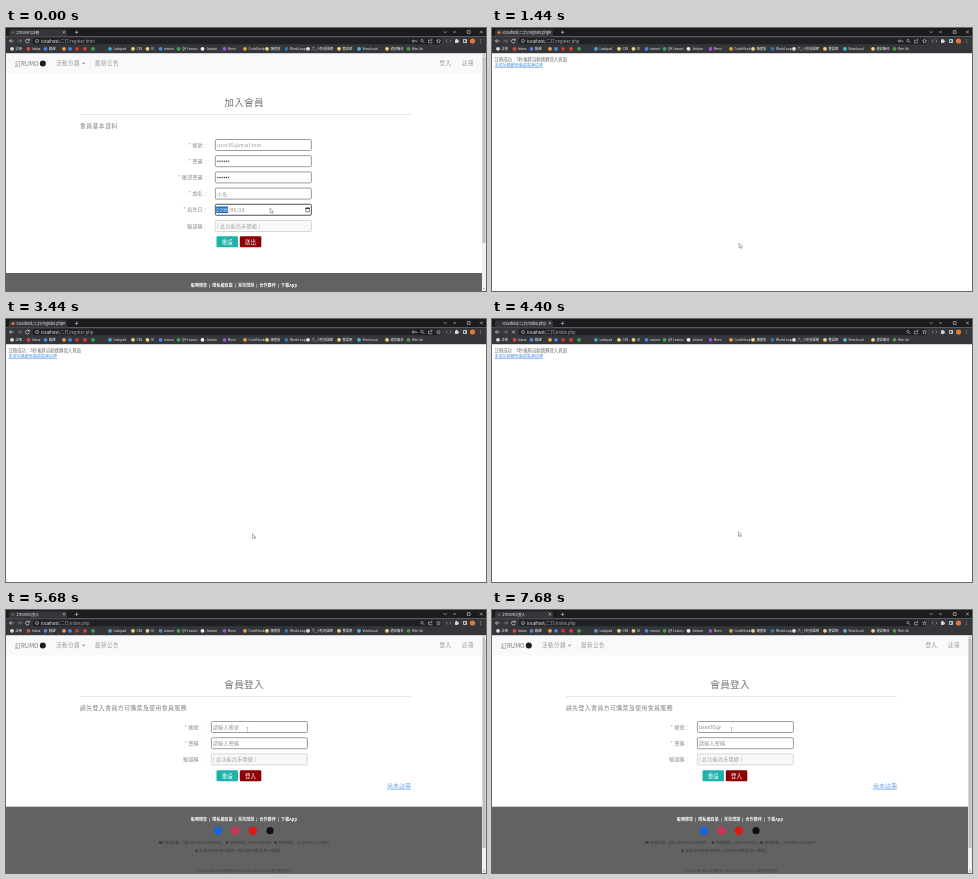
Write an HTML page that moves like this. It is 480 px wide and 263 px high and loops after 8000 ms.

```html
<!DOCTYPE html>
<html lang="zh-Hant">
<head>
<meta charset="utf-8">
<title>Member sign-up</title>
<style>
html, body { margin: 0; width: 100%; height: 100%; overflow: hidden; background: #fff; }
svg { display: block; width: 100%; height: 100%; }
text { font-family: "Noto Sans CJK TC", "Noto Sans CJK JP", "Noto Sans CJK", "Noto Sans", sans-serif; white-space: pre; }
</style>
</head>
<body>
<svg id="stage" viewBox="0 0 480 263"></svg>
<script>
const LOOP = 8000, SUBMITTED = 1400, LOADING = 4240, LOGIN = 4480;
const TYPING = 6000, KEY_GAP = 240;
const EMAIL = 'user35@mail.test', BRAND = '訂RUMO', COLON = '\uff1a';

const text = (x, y, size, fill, value, extra = '') =>
  `<text x="${x}" y="${y}" font-size="${size}" fill="${fill}" ${extra}>${value}</text>`;
const rect = (x, y, w, h, fill, extra = '') =>
  `<rect x="${x}" y="${y}" width="${w}" height="${h}" fill="${fill}" ${extra}/>`;
const dot = (x, y, r, fill, extra = '') =>
  `<circle cx="${x}" cy="${y}" r="${r}" fill="${fill}" ${extra}/>`;
const line = (d, stroke, width = .7, extra = '') =>
  `<path d="${d}" fill="none" stroke="${stroke}" stroke-width="${width}" ${extra}/>`;
const group = (id, content) => `<g id="${id}">${content}</g>`;
const middle = 'text-anchor="middle"', end = 'text-anchor="end"';
const spaced = gap => `letter-spacing="${gap}"`;

// [icon x, icon colour, label]
const bookmarks = [
  [6, '#ddd', '註冊'], [22.5, '#e0483e', 'Inbox'], [39.5, '#4b86e8', '翻譯'],
  [58, '#e8a33d', ''], [64, '#4b86e8', ''], [71, '#d8342c', ''], [79, '#e0402c', ''], [87, '#3fa35b', ''],
  [104, '#46a5d8', 'Larkpad'], [127, '#f0d27a', 'CSS'], [141.5, '#f0d27a', 'UI'],
  [154.5, '#4b86e8', 'uimori'], [172.5, '#3fa35b', 'Q4 Lesson'], [196.5, '#eee', 'Jottum'],
  [218.5, '#a050d8', 'Brevi'], [239, '#e8a33d', 'CodeNook'], [261, '#f0d27a', '讀書會'],
  [280.5, '#2a78b8', 'WorkLoop'], [302, '#ddd', '六_小吃地圖網'], [333, '#f0d27a', '雙語網'],
  [353, '#4ab8d8', 'ViewLocal'], [381, '#f0d27a', '通訊聯合'], [402.5, '#4e9a48', 'Kite.lib']
];

function browser() {
  const ink = '#d5d6d8';
  return rect(0, 0, 480, 8.6, '#1b1c1e') +
    `<path d="M1 8.6Q3 8.6 3 6V3Q3 1.2 5 1.2H59Q61 1.2 61 3V6Q61 8.6 63 8.6Z" fill="#35363a"/>` +
    rect(0, 8.6, 480, 16.6, '#35363a') +
    rect(26.5, 9.8, 409, 6.4, '#202124', 'rx="3.2"') +
    dot(7, 4.5, 1.6, '#777', 'id="favicon"') +
    text(10.5, 5.8, 3.7, '#f0f0f0', '', 'id="tabTitle"') +
    line('M56.7 3l2.4 2.4m0-2.4l-2.4 2.4M68.8 4.3h3.6m-1.8-1.8v3.6', ink, .6) +
    line('M437.7 3.4l1.5 1.5 1.5-1.5M447 4h3M461.3 2.6h2.8v2.8h-2.8ZM474 2.6l2.8 2.8m0-2.8l-2.8 2.8', ink, .6) +
    line('M7.5 13H3.5m1.8-1.8L3.5 13l1.8 1.8', ink) +
    line('M11.5 13h4m-1.8-1.8l1.8 1.8-1.8 1.8', '#87898c') +
    group('reload', line('M23 12a1.9 1.9 0 1 0 .2 1.8M23.3 10.8v1.5h-1.5', ink)) +
    group('stop', line('M20 11.5l3 3m0-3l-3 3', ink)) +
    dot(31, 13, 1.6, 'none', `stroke="${ink}" stroke-width=".5"`) + line('M31 12.7v1.2', ink, .5) +
    text(35, 14.6, 4.15, '#b0b2b5', '<tspan fill="#fff" font-weight="500">localhost</tspan><tspan id="path"></tspan>') +
    group('key', dot(407.3, 13, 1, 'none', `stroke="${ink}" stroke-width=".6"`) + line('M408.3 13h2.5v1', ink, .6)) +
    dot(416, 12.6, 1.2, 'none', `stroke="${ink}" stroke-width=".5"`) + line('M417 13.6l1.3 1.3', ink, .6) +
    line('M424 12h-1.5v2.8h3.4v-1.2M424 13.3q.2-1.6 2.2-1.6m-1-.9l1 .9-1 .9', ink, .5) +
    line('M432.5 10.9l.6 1.4 1.5.1-1.1 1 .3 1.5-1.3-.8-1.3.8.3-1.5-1.1-1 1.5-.1Z', ink, .5) +
    line('M441.3 11.6L440 13l1.3 1.4m2.4-2.8L445 13l-1.3 1.4', '#9a9ca0', .6) +
    rect(449, 11.7, 3.2, 3.2, ink) + dot(450.5, 11.5, .8, ink) + dot(452.3, 13.3, .8, ink) +
    rect(457.2, 11.2, 3.6, 3.6, '#eee') + rect(457.9, 11.9, 1.6, 2.2, '#35363a') +
    dot(466.5, 13, 2.6, '#e07a3c') +
    [11.6, 13, 14.4].map(y => dot(474.5, y, .4, ink)).join('') +
    bookmarks.map(([x, color, label]) =>
      dot(x, 20.8, 1.9, color) + text(x + 3.4, 22, 3.3, '#f2f2f2', label, 'font-weight="500"')).join('');
}

const navbar = () => rect(0, 25.2, 480, 20.3, '#f8f9fa') +
  text(9, 37.8, 6, '#777', BRAND) + dot(36.8, 35.6, 3, '#1c1c1c') +
  text(50, 37.4, 5.5, '#999', '活動分類', spaced(.5)) + '<path d="M76 34.8h3.2l-1.6 1.8z" fill="#888"/>' +
  [[89, '最新公告'], [433.5, '登入'], [456, '註冊']].map(([x, s]) => text(x, 37.4, 5.5, '#999', s, spaced(.5))).join('');

const scrollbar = thumbEnd => rect(476, 25.2, 4, 238, '#f1f1f1') +
  rect(476.4, 28.5, 3.2, thumbEnd - 28.5, '#c1c1c1') +
  '<path d="M477 27.5h2l-1-1.2zM477 260.5h2l-1 1.2z" fill="#777"/>';

const heading = (title, subtitle) => text(218.3, 78.2, 9.6, '#777', title, spaced(.3)) +
  line('M74 86.5H405', '#dcdcdc') +
  text(74, 100.3, 5.9, '#808080', subtitle, spaced(.4));

const rowY = row => 117 + row * 16.2;

function field(x, row, label, value, { required = true, disabled = false, id = '' } = {}) {
  const y = rowY(row);
  const star = required ? '<tspan fill="#c58080">* </tspan>' : '';
  return text(x - 7, y + 1.6, 5, '#8a8a8a', star + label + COLON, `${end} ${spaced(.2)}`) +
    rect(x + .4, y - 5.5, 96, 11, disabled ? '#f8f8f8' : '#fff',
      `rx="1.2" stroke="${disabled ? '#d0d0d0' : '#848484'}" stroke-width=".8"`) +
    text(x + 2, y + 1.9, 5, disabled ? '#a0a0a0' : '#959595', value, spaced(.25) + (id && ` id="${id}"`));
}

const locked = (x, row) => field(x, row, '驗證碼', '( 此功能尚未開通 )', { required: false, disabled: true });
const password = (x, row) => Array.from({ length: 6 }, (_, i) => dot(x + 3 + i * 2.1, rowY(row), .75, '#444')).join('');
const button = (x, y, fill, label) => rect(x, y, 21.5, 11, fill, 'rx="1.2"') +
  text(x + 10.75, y + 7.6, 5.5, '#fff', label, middle);
const buttons = (x, y, action) => button(x, y, '#20b2aa', '重設') + button(x + 23.3, y, '#8b0000', action);

const footer = top => rect(0, top, 480, 263 - top, '#626262') +
  text(238, top + 14, 4, '#fff', '服務條款  |  隱私權政策  |  常見問題  |  合作夥伴  |  下載App',
    `${middle} font-weight="700" ${spaced(.08)}`);

function registerPage() {
  const x = 209, y = rowY(4);
  return navbar() + heading('加入會員', '會員基本資料') +
    field(x, 0, '帳號', EMAIL) +
    field(x, 1, '密碼', '') + password(x, 1) +
    field(x, 2, '確認密碼', '') + password(x, 2) +
    field(x, 3, '姓名', '小名') +
    field(x, 4, '出生日', '') +
    rect(x + .4, y - 5.5, 96, 11, 'none', 'rx="1.2" stroke="#666" stroke-width=".9"') +
    rect(x + 1.2, y - 3.3, 11.8, 6.6, '#1a6fc4') +
    text(x + 1.6, y + 1.9, 5, '#fff', '1998') + text(x + 13.4, y + 1.9, 5, '#8a8a8a', '/06/28', spaced(.2)) +
    line(`M299.8 ${y - 1.8}h3.6v3.8h-3.6Z`, '#333', .6) + rect(299.6, y - 2.1, 4, 1.3, '#333') +
    locked(x, 5) + buttons(210.5, 208.3, '送出') + footer(245) + scrollbar(215);
}

const successPage = () =>
  text(2.5, 32.6, 4.38, '#707070', `註冊成功${COLON}3秒後將自動跳轉登入頁面`) +
  text(2.5, 38.9, 4.05, '#4a90e8', '未成功跳轉頁面請點擊這裡') + line('M2.5 39.6H51', '#4a90e8', .5);

function loginPage() {
  const x = 205, dim = '#3c3c3c';
  return navbar() + heading('會員登入', '請先登入會員方可購票及使用會員服務') +
    field(x, 0, '帳號', '', { id: 'account' }) +
    field(x, 1, '密碼', '請輸入密碼') +
    locked(x, 2) + buttons(210.5, 160.2, '登入') +
    text(381, 178, 6, '#65a2ea', '尚未註冊') + line('M381 179.3H405', '#65a2ea', .6) +
    footer(196.7) +
    dot(211.8, 220.7, 4.2, '#1468d8') + dot(229.3, 220.7, 4.4, '#c23a56') +
    dot(246.8, 220.7, 4.2, '#e01818') + dot(264, 220.7, 3.6, '#111') +
    rect(153, 231.2, 3.6, 2.6, dim) + dot(221, 232.5, 1.5, dim) + dot(269.5, 232.5, 1.6, dim) +
    text(158.5, 234, 3.7, dim, `服務信箱${COLON}info.service@mail.test`) +
    text(224, 234, 3.7, dim, `客服專線${COLON}0000-000-000`) +
    text(272.5, 234, 3.7, dim, `服務時間${COLON}10:00am~10:00pm`) +
    dot(190.5, 240.8, 1.4, dim) +
    text(193, 242.2, 3.9, dim, '某某市中央區示範路一段00號00樓(近第一廣場)') +
    text(238, 261.5, 3.5, '#444', `© 2022 ${BRAND} 版權所有 All Rights Reserved. 僅供練習使用`, middle) +
    scrollbar(238);
}

const $ = id => document.getElementById(id);
$('stage').innerHTML = rect(0, 0, 480, 263, '#fff') +
  group('register', registerPage()) + group('success', successPage()) + group('login', loginPage()) +
  browser() +
  group('pointer',
    group('arrow', '<path d="M0-2.4V2.3L1.1 1.4 1.9 3 2.7 2.6 2 1.1H3.3Z" fill="#fff" stroke="#666" stroke-width=".5"/>') +
    group('beam', line('M-1-2.6H1M0-2.6V2.6M-1 2.6H1', '#999', .5)));

// [time, x, y]
const pointerPath = [
  [0, 264, 182.5], [480, 264, 182.5], [1200, 247, 217.5], [2160, 247, 217.5], [2240, 246.5, 217],
  [4240, 246.5, 217], [4320, 246.5, 215], [4500, 246.5, 215], [5040, 243, 146], [5520, 241.5, 120],
  [6000, 241.5, 120], [6400, 239.5, 120]
];

function pointerAt(t) {
  const next = pointerPath.findIndex(p => p[0] > t);
  if (next < 0) return pointerPath.at(-1).slice(1);
  const [t0, x0, y0] = pointerPath[next - 1], [t1, x1, y1] = pointerPath[next];
  const k = (t - t0) / (t1 - t0), ease = k * k * (3 - 2 * k);
  return [x0 + (x1 - x0) * ease, y0 + (y1 - y0) * ease];
}

const show = (id, visible) => $(id).setAttribute('display', visible ? 'inline' : 'none');

function render(t) {
  const onLogin = t >= LOGIN, onRegister = t < SUBMITTED, loading = t >= LOADING && !onLogin;
  show('register', onRegister);
  show('success', !onRegister && !onLogin);
  show('login', onLogin);
  show('key', t < LOADING);
  show('stop', loading);
  show('reload', !loading);
  show('favicon', !loading);
  $('favicon').setAttribute('fill', !onRegister && !onLogin ? '#e8743c' : '#55575b');

  const path = '/二訂/' + (onRegister ? 'register.html' : t < LOADING ? 'register.php' : 'index.php');
  $('path').textContent = path;
  $('tabTitle').textContent = onRegister ? BRAND + '|註冊' : onLogin ? BRAND + '|登入' : 'localhost' + path;

  const typed = t < TYPING ? 0 : Math.min(7, Math.floor((t - TYPING) / KEY_GAP) + 1);
  $('account').textContent = typed ? EMAIL.slice(0, typed) : '請輸入帳號';
  $('account').setAttribute('fill', typed ? '#777' : '#959595');

  const [x, y] = pointerAt(t);
  const overField = onLogin && y < 123;
  $('pointer').setAttribute('transform', `translate(${x} ${y})`);
  show('beam', overField);
  show('arrow', !overField);
}

const start = performance.now();
function tick() {
  render((performance.now() - start) % LOOP);
  requestAnimationFrame(tick);
}
tick();
</script>
</body>
</html>
```
